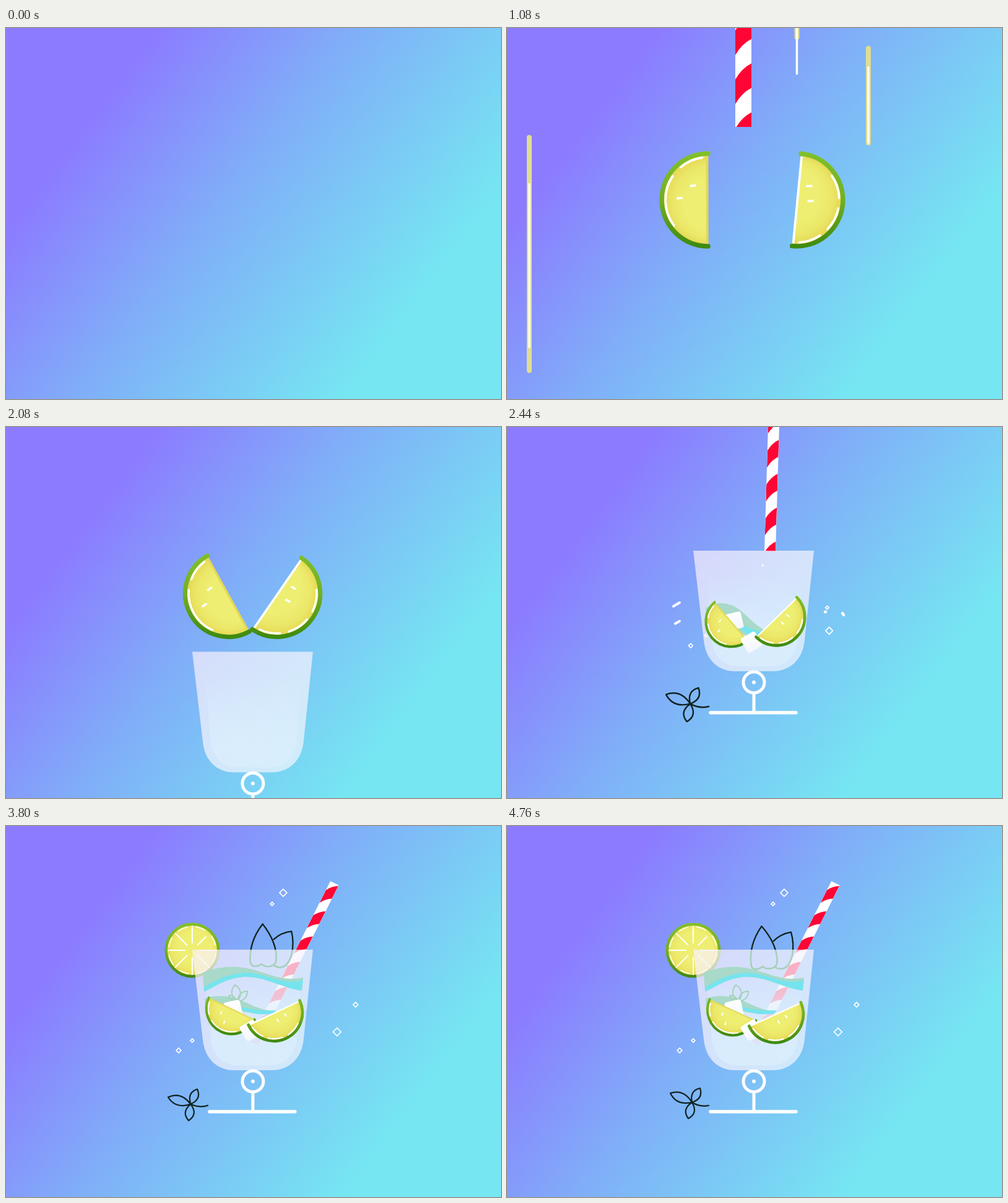
These frames come from a looping animation (800x600 px, 4800 ms). An HTML page with a canvas:

```html
<!DOCTYPE html>
<html lang="en">
<head>
<meta charset="utf-8">
<title>Lime cooler</title>
<style>
  html, body { margin: 0; width: 100%; height: 100%; overflow: hidden; }
  canvas { display: block; }
</style>
</head>
<body>
<canvas width="800" height="600"></canvas>
<script>
const ctx = document.querySelector('canvas').getContext('2d');
const LOOP = 4800, TOSS = 1080, SPLASH = 2440, RAD = Math.PI / 180;
const INK = '#10231f', PALE_LEAF = '#a6d2b8', YELLOW = '#eeee72';

const glass = new Path2D('M301 200H496L481 345C478 378 455 395 430 395H368C343 395 321 378 318 345Z');
const drink = new Path2D('M322 240H477L470 345C466 372 450 386 428 387H372C350 386 334 372 331 345Z');
const mint = new Path2D('M0-68C-14-50-22-28-20-5C-18 3-8 2-2-3C6 4 20 2 22-8C24-30 14-50 0-68ZM18-43Q30-54 47-56C53-30 46-2 32 2Q24 4 18-1');
const waves = [
  { green: new Path2D('M318 238C335 229 358 227 375 228C415 231 440 254 480 245L478 266C445 262 420 243 385 244C355 246 338 260 320 268Z'),
    cyan: new Path2D('M320 261C338 250 355 240 385 237C420 237 445 259 480 249L478 266C445 262 420 243 385 244C355 246 338 260 320 268Z'),
    level: 245, start: SPLASH, depth: 45 },
  { green: new Path2D('M321 279C335 274 350 274 365 277C390 283 405 299 436 299L430 304C400 306 370 296 322 293Z'),
    cyan: new Path2D('M366 290C390 294 405 300 436 298L430 304C405 306 388 302 366 290Z'),
    level: 285, start: SPLASH - 100, depth: 20 }
];

// Motion rules
const lerp = (a, b, p) => a + (b - a) * p;
const ramp = (t, from, to) => Math.max(0, Math.min(1, (t - from) / (to - from)));
const smooth = (t, from, to) => { const p = ramp(t, from, to); return p * p * (3 - 2 * p); };
const decay = (t, start, tau) => Math.exp(-Math.max(0, t - start) / tau);
const spring = (t, start) => t < start ? 0 : 1 - decay(t, start, 210) * Math.cos((t - start) * Math.PI / 240);
const sway = t => Math.cos((t - 3800) * Math.PI / 960);
const settle = t => decay(t, SPLASH, 400);
const lift = t => (TOSS - t) * 2;

function at(x, y, angle, scale, draw) {
  ctx.save();
  ctx.translate(x, y);
  ctx.rotate(angle * RAD);
  ctx.scale(scale, scale);
  draw();
  ctx.restore();
}

function stroke(color, width, path) {
  ctx.strokeStyle = color;
  ctx.lineWidth = width;
  path ? ctx.stroke(path) : ctx.stroke();
}

function line(x1, y1, x2, y2, color, width) {
  ctx.beginPath();
  ctx.moveTo(x1, y1);
  ctx.lineTo(x2, y2);
  stroke(color, width);
}

function arc(r, from, to, color, width) {
  ctx.beginPath();
  ctx.arc(0, 0, r, from * RAD, to * RAD);
  stroke(color, width);
}

function gradient(x1, y1, x2, y2, ...colors) {
  const g = ctx.createLinearGradient(x1, y1, x2, y2);
  colors.forEach((c, i) => g.addColorStop(i / (colors.length - 1), c));
  return g;
}

function pulp() {
  const g = ctx.createRadialGradient(.1, -.1, .6, 0, 0, 1);
  g.addColorStop(0, YELLOW);
  g.addColorStop(.5, '#ebe768');
  g.addColorStop(1, '#e4d550');
  return g;
}

function rind(angle) {
  const x = Math.sin(angle * RAD), y = Math.cos(angle * RAD);
  return gradient(-x, -y, x, y, '#80c02a', '#70b022', '#3f8a10');
}

// Tossed up, hangs while turning, then drops into the glass.
function wedge(t, w) {
  const drop = ramp(t, 2050, 2400) ** 2;
  const x = lerp(w.restX, w.startX, Math.exp((TOSS - t) / 500));
  const y = lerp(269 + 9 * Math.exp((TOSS - t) / 160), w.restY + w.sink * settle(t) - 1.3 * sway(t), drop);
  const r = lerp(75 - .0047 * (t - TOSS), w.restR, drop);
  const turn = w.tilt - .029 * (Math.min(t, 2400) - TOSS);
  const angle = w.side * lerp(24.5, turn, decay(t, 2400, 430));
  at(x, y, angle, r, () => {
    ctx.beginPath();
    ctx.arc(0, 0, 1, 0, Math.PI);
    ctx.closePath();
    ctx.fillStyle = pulp();
    ctx.fill();
    line(-.92, .02, .92, .02, w.edge, .05);
    arc(1, 0, 180, rind(angle), .1);
    for (const [from, to] of w.glints) arc(.92, from, to, '#fff', .05);
    for (const [sx, sy] of w.seeds) line(sx, sy - .04, sx + .01, sy + .05, '#fff', .05);
  });
}

const leftWedge = {
  side: 1, startX: 325, restX: 365, restY: 296, restR: 41, tilt: 90, sink: 18, edge: '#e4d856',
  glints: [[53, 124], [140, 172]], seeds: [[-.31, .32], [-.04, .61]]
};
const rightWedge = {
  side: -1, startX: 468, restX: 433, restY: 303, restR: 46, tilt: 84.5, sink: 4, edge: '#fff',
  glints: [[50, 82], [96, 128], [141, 171]], seeds: [[.32, .24], [0, .3]]
};

function wheel(scale) {
  at(301, 201, 0, 44 * scale, () => {
    ctx.beginPath();
    ctx.arc(0, 0, .97, 0, 7);
    ctx.fillStyle = pulp();
    ctx.fill();
    arc(.96, 0, 360, rind(0), .1);
    for (let a = 0; a < 360; a += 45) {
      const c = Math.cos(a * RAD), s = Math.sin(a * RAD), end = a === 315 ? .7 : .88;
      line(c * .27, s * .27, c * end, s * end, '#fff', .045);
      arc(.87, a + 8, a + 32, '#fffde0', .04);
    }
  });
}

function straw(x, y, angle, w) {
  const length = 19.3 * w, pitch = 3.05 * w;
  at(x, y, angle, 1, () => {
    ctx.beginPath();
    ctx.rect(-w / 2, -length, w, length);
    ctx.clip();
    ctx.fillStyle = '#fff';
    ctx.fillRect(-w, -length, 2 * w, length);
    ctx.fillStyle = '#ff0535';
    for (let top = -length + 1.1 * w; top < w; top += pitch) {
      const low = top + pitch / 2;
      ctx.beginPath();
      ctx.moveTo(-w / 2, top);
      ctx.quadraticCurveTo(-w * .1, top - w * .7, w / 2, top - w);
      ctx.lineTo(w / 2, low - w);
      ctx.quadraticCurveTo(-w * .1, low - w * .7, -w / 2, low);
      ctx.fill();
    }
  });
}

// Flies up out of the stage, returns and leans over in the glass.
function drawStraw(t) {
  if (t < 1900) return straw(382, 162 + lift(t), 0, 26);
  const lean = smooth(t, SPLASH, 3500), slip = lean * lean;
  const y = Math.min(200 + (t - SPLASH) * 1.2, 390 - 39 * slip);
  straw(425 - 24 * slip, y, 1.7 + 25 * lean, 18 - 3 * ramp(t, SPLASH, 2700));
}

function leaflet(x, y, tipX, tipY, bulge, color, width) {
  const dx = tipX - x, dy = tipY - y, k = bulge / Math.hypot(dx, dy);
  const mx = x + dx * .55, my = y + dy * .55;
  ctx.beginPath();
  ctx.moveTo(x, y);
  ctx.quadraticCurveTo(mx - dy * k, my + dx * k, tipX, tipY);
  ctx.quadraticCurveTo(mx + dy * k, my - dx * k, x, y);
  stroke(color, width);
}

function sprig(t) {
  at(326, 452, -3 - 3 * sway(t), smooth(t, 2100, 2320) * (1 + .1 * settle(t)), () => {
    leaflet(-27, -5, -62, -20, 15, INK, 2.2);
    leaflet(-27, -5, -14, -28, 13, INK, 2.2);
    leaflet(-27, -5, -33, 21, 14, INK, 2.2);
    ctx.beginPath();
    ctx.moveTo(-27, -5);
    ctx.quadraticCurveTo(-14, 3, 0, 0);
    stroke(INK, 2.2);
  });
}

function ice(t, x, y, angle) {
  const size = 27, above = 400 * (1 - ramp(t, 2050, 2400) ** 2);
  at(x, y + 18 * settle(t) - above, angle + above / 4, 1, () => {
    ctx.beginPath();
    ctx.roundRect(-size / 2, -size / 2, size, size, 4);
    ctx.fillStyle = gradient(0, -size / 2, 0, size / 2, '#fff', '#f4f6ff');
    ctx.fill();
  });
}

function sparkles(t) {
  const rest = [[535, 333, 6.5], [279, 363, 4], [301, 347, 3], [565, 289, 4], [448, 108, 6], [430, 126, 3]];
  rest.forEach(([x, y, r], i) => {
    const p = 1 - decay(t, 2340 + 15 * i, 45);
    if (p > 0) at(lerp(400, x, p), lerp(300, y, p), 45, 1, () => {
      const side = r * p * Math.SQRT2;
      ctx.beginPath();
      ctx.rect(-side / 2, -side / 2, side, side);
      stroke('#fff', 1.7);
    });
  });
  ctx.globalAlpha = ramp(t, 2360, 2400) * ramp(t, 2620, 2480);
  const out = (t - SPLASH) * .06;
  line(269 - out, 290, 279 - out, 284, '#fff', 4);
  line(272 - out, 318, 279 - out, 314, '#fff', 4);
  line(514 + out, 299, 515 + out, 299, '#fff', 4.5);
  line(542 + out, 301, 544 + out, 304, '#fff', 4.5);
  ctx.globalAlpha = 1;
}

function speedLines(t) {
  const dy = lift(t);
  // x, top, bottom, end of the bright core
  for (const [x, top, bottom, tail] of [[36, 179, 556, 518], [584, 35, 188, 188], [468.5, -200, 17, 76]]) {
    line(x, top + dy, x, bottom + dy, '#e0dd92', 8);
    line(x, lerp(top, bottom, .2) + dy, x, tail + dy, '#fffff0', 3.5);
  }
}

function drawWaves(t) {
  for (const { green, cyan, level, start, depth } of waves) {
    const low = 1 - smooth(t, SPLASH, 2900);
    ctx.save();
    ctx.globalAlpha = ramp(t, start, start + 100);
    ctx.translate(0, level + depth * low);
    ctx.scale(1, 1 + low);
    ctx.translate(0, -level);
    ctx.fillStyle = '#a8d9c9';
    ctx.fill(green);
    ctx.fillStyle = '#76e4ee';
    ctx.fill(cyan);
    ctx.restore();
  }
}

function drawMint(t, color) {
  const scale = spring(t, 2800);
  if (scale > .02) at(415 + 28 * (scale - 1), 228 - 2 * sway(t), 1.5 * sway(t) - 1.5, scale,
    () => stroke(color, 2.3 / scale, mint));
}

function drawGlass(t) {
  ctx.save();
  ctx.translate(0, 420 * (1 - ramp(t, 2000, 2300)) ** 3);
  ctx.fillStyle = gradient(310, 200, 470, 390, 'rgba(250,240,252,.7)', 'rgba(246,244,253,.72)', 'rgba(238,244,253,.74)');
  ctx.fill(glass);
  ctx.fillStyle = gradient(0, 240, 0, 345, 'rgba(218,238,253,0)', 'rgba(218,238,253,.8)');
  ctx.fill(drink);
  at(399, 413, 0, 1, () => {
    arc(17, 0, 360, '#fff', 5);
    line(0, 0, .01, 0, '#fff', 6);
    line(0, 20, 0, 47, '#fff', 5);
    line(-70, 49, 68, 49, '#fff', 5.5);
  });

  ctx.clip(glass);
  drawMint(t, PALE_LEAF);
  drawWaves(t);
  at(374, 284, 0, spring(t, 2690), () => {
    leaflet(0, 0, -4, -27, 14, PALE_LEAF, 2);
    leaflet(0, 0, 16, -17, 10, PALE_LEAF, 2);
    leaflet(0, 0, -14, -10, 6, PALE_LEAF, 2);
  });
  ctx.restore();
}

function draw(t) {
  ctx.lineCap = ctx.lineJoin = 'round';
  const sky = gradient(152, 114, 636, 477, '#8c7aff', '#76e6f2');
  sky.addColorStop(.43, '#80aef8');
  ctx.fillStyle = sky;
  ctx.fillRect(0, 0, 800, 600);

  speedLines(t);
  drawMint(t, INK);
  sparkles(t);
  drawStraw(t);
  wheel(spring(t, 2690));
  drawGlass(t);
  sprig(t);
  ice(t, 367, 296, -13);
  wedge(t, leftWedge);
  ice(t, 395, 330, -31);
  wedge(t, rightWedge);
}

function frame() {
  draw(performance.now() % LOOP);
  requestAnimationFrame(frame);
}
frame();
</script>
</body>
</html>
```
